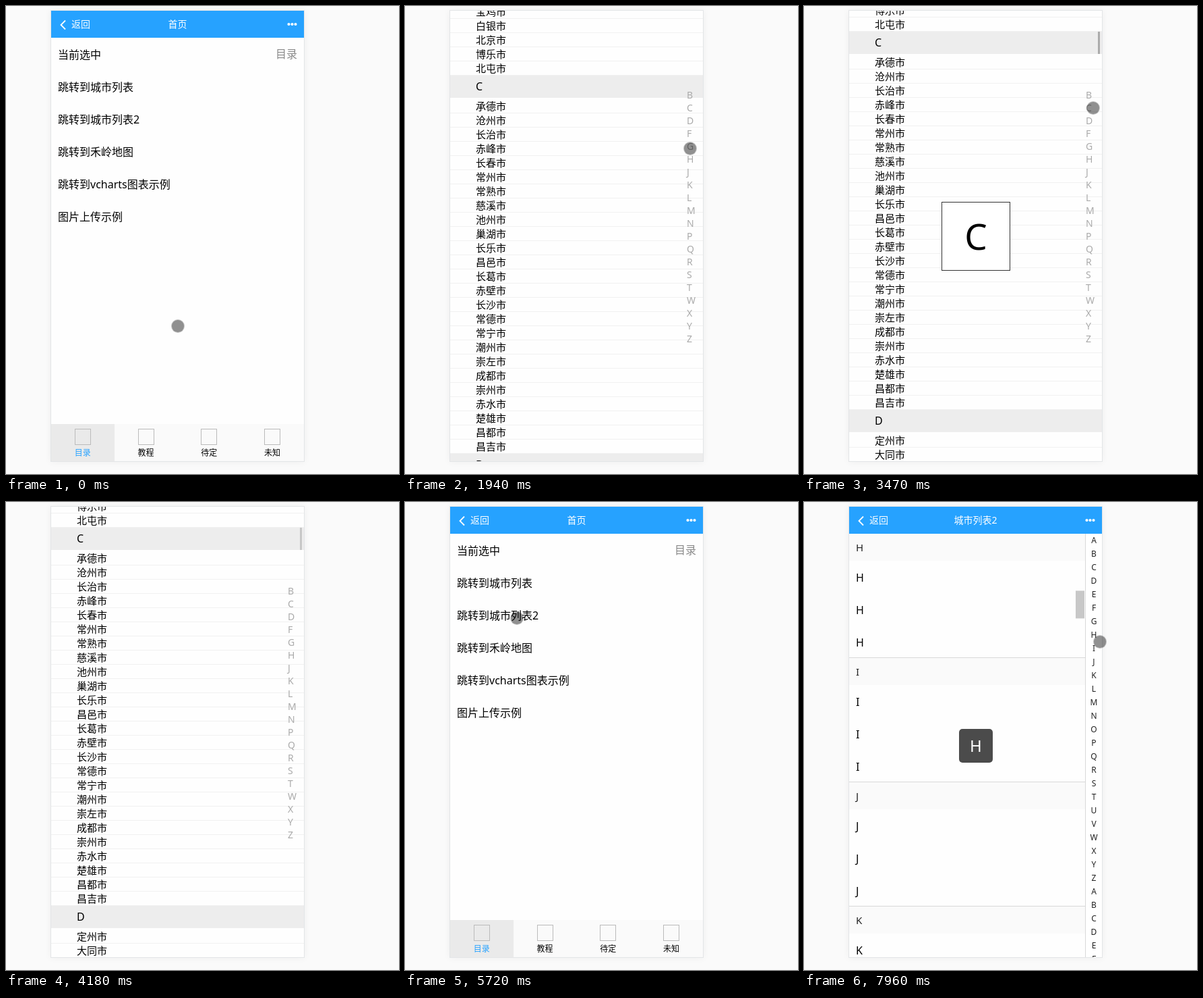
An HTML page that plays this animation: 583 px wide and 693 px high, repeating every 8 s.

```html
<!DOCTYPE html>
<html lang="zh-CN">
<head>
<meta charset="utf-8">
<title>移动端示例</title>
<style>
* { box-sizing: border-box; }
html, body { margin: 0; width: 100%; height: 100%; overflow: hidden; }
body {
  position: relative; background: #fafafa; color: #000;
  font: 16px/48px "Noto Sans", "Noto Sans CJK SC", "Noto Sans CJK", sans-serif;
}
#phone {
  position: absolute; left: 67px; top: 7px; width: 375px; height: 667px;
  overflow: hidden; background: #fff;
  box-shadow: 0 0 0 1px #e3e5e7, 0 0 10px 1px rgba(0, 0, 0, .05);
}
.screen { position: absolute; inset: 0; background: #fefefe; animation: 8s step-end infinite; }
.head {
  position: absolute; z-index: 2; inset: 0 0 auto; height: 40px;
  background: #26a2ff; color: #fff; font-size: 14px; line-height: 40px; text-align: center;
}
.head svg { position: absolute; inset: 0; }
.head .back { position: absolute; left: 30px; }

/* home */
#home { animation-name: home; }
.cells { position: absolute; left: 10px; right: 10px; top: 41px; }
.cells div { height: 48px; }
.cells span { float: right; color: #888; line-height: 46px; }
.tabs { position: absolute; inset: auto 0 0; height: 55px; display: flex; background: #fafafa; }
.tabs div { flex: 1; padding-top: 7px; font-size: 12px; line-height: 23px; text-align: center; }
.tabs i { display: block; width: 24px; height: 24px; margin: 0 auto; border: 1px solid #bbb; }
.tabs .on { background: #eaeaea; color: #26a2ff; }

/* city list */
#cities { animation-name: cities; }
#towns { position: absolute; left: 0; right: 0; top: 31px; transform: translateY(calc(0px - var(--top))); }
#towns h4 { margin: 0 0 2px; height: 33px; padding-left: 38px; background: #ededed; font: inherit; line-height: 33px; }
#towns div { height: 21px; padding-left: 38px; border-bottom: 1px solid #f1f1f1; font-size: 15px; line-height: 21px; }
#letters { position: absolute; left: 351px; top: 115px; color: #aaa; font-size: 14px; line-height: 19px; }
.bar {
  position: absolute; left: 369px; top: 31px; width: 3px; height: 33px; background: #000;
  opacity: var(--bar); transform: translateY(calc((var(--top) - 140px) / 19.5));
}
.pop, .toast { position: absolute; overflow: hidden; text-align: center; opacity: var(--pop); }
.pop { left: 137px; top: 283px; width: 102px; height: 102px; border: 1px solid #333; background: #fff; font-size: 53px; line-height: 100px; }
.pop div { transform: translateY(calc(var(--n) * -100px)); }

/* indexed list */
#indexed { animation-name: indexed; }
#sections { position: absolute; left: 0; top: 40px; width: 350px; transform: translateY(calc(var(--i) * -184px)); }
#sections section { height: 184px; padding: 0 10px; border-bottom: 1px solid #d9d9d9; background: linear-gradient(#fafafa 40px, #fefefe 0); }
#sections h4 { margin: 0 0 1px; height: 40px; color: #222; font: 15px/40px "Noto Sans", sans-serif; }
#sections div { height: 48px; }
.thumb { position: absolute; left: 336px; top: 40px; width: 13px; height: 41px; background: #c8c8c8; transform: translateY(calc(var(--i) * 12.06px)); }
#nav { position: absolute; left: 350px; right: 0; top: 40px; bottom: 0; overflow: hidden; border-left: 1px solid #d9d9d9; background: #fff; color: #222; font-size: 12px; line-height: 20px; text-align: center; }
.toast { left: 163px; top: 329px; width: 50px; height: 50px; border-radius: 5px; background: rgba(0, 0, 0, .7); color: #fff; font-size: 24px; line-height: 50px; }
.toast div { transform: translateY(calc((var(--i) - 3) * -50px)); }

#touch {
  position: absolute; left: -9.5px; top: -9.5px; width: 19px; height: 19px; border-radius: 50%;
  border: 1px solid rgba(0, 0, 0, .06); background: rgba(0, 0, 0, .43);
  animation: move 8s ease-in-out infinite, shown 8s step-end infinite;
}

@keyframes home {
  0%, 54.125% { visibility: visible; }
  15.25%, 75.375%, 100% { visibility: hidden; }
}
@keyframes cities {
  0% { visibility: hidden; --top: 75px; --n: 0; --pop: 0; --bar: 0; }
  15.25% { visibility: visible; --top: 75px; --n: 0; --pop: 0; --bar: 0; }
  30% { visibility: visible; --top: var(--G); --n: 0; --pop: 1; --bar: .28; }
  32.7% { visibility: visible; --top: var(--F); --n: 1; --pop: 1; --bar: .28; }
  35% { visibility: visible; --top: var(--D); --n: 2; --pop: 1; --bar: .28; }
  40.5% { visibility: visible; --top: var(--C); --n: 3; --pop: 1; --bar: .28; }
  46.5% { visibility: visible; --top: var(--C); --n: 3; --pop: 0; --bar: .28; }
  50% { visibility: visible; --top: var(--C); --n: 3; --pop: 0; --bar: .16; }
  54.125%, 100% { visibility: hidden; --top: var(--C); --n: 3; --pop: 0; --bar: 0; }
}
@keyframes indexed {
  0% { visibility: hidden; --i: 0; --pop: 0; }
  75.375% { visibility: visible; --i: 0; --pop: 0; }
  90.6% { visibility: visible; --i: 3; --pop: 1; }
  92.6% { visibility: visible; --i: 4; --pop: 1; }
  94% { visibility: visible; --i: 5; --pop: 1; }
  95.2% { visibility: visible; --i: 6; --pop: 1; }
  96.7%, 100% { visibility: visible; --i: 7; --pop: 1; }
}
@keyframes move {
  0%, .6% { transform: translate(254.5px, 473.5px); }
  10.5%, 15% { transform: translate(154.5px, 127.5px); }
  24.25%, 30% { transform: translate(422.5px, 210.5px); }
  36.75%, 38% { transform: translate(430.5px, 164.5px); }
  41.5%, 46.25% { transform: translate(428.5px, 150.5px); }
  49.4% { transform: translate(422px, 17px); }
  49.5%, 58.1% { transform: translate(48.5px, 19.5px); }
  62.5% { transform: translate(429.5px, 617.5px); }
  67.5%, 69.4% { transform: translate(164px, 185.5px); }
  71.5%, 75.3% { transform: translate(165.5px, 171.5px); }
  85%, 86% { transform: translate(441.5px, 119.5px); }
  86.9% { transform: translate(439.5px, 114.5px); }
  87.9%, 89.6% { transform: translate(437px, 110px); }
  99.5%, 100% { transform: translate(438.5px, 206.5px); }
}
@keyframes shown {
  0%, 58.1%, 100% { opacity: 1; }
  49.4% { opacity: 0; }
}
</style>
</head>
<body>
<div id="phone">
  <div class="screen" id="home">
    <div class="head" data-title="首页"></div>
    <div class="cells">
      <div>当前选中<span>目录</span></div>
      <div>跳转到城市列表</div>
      <div>跳转到城市列表2</div>
      <div>跳转到禾岭地图</div>
      <div>跳转到vcharts图表示例</div>
      <div>图片上传示例</div>
    </div>
    <div class="tabs">
      <div class="on"><i></i>目录</div>
      <div><i></i>教程</div>
      <div><i></i>待定</div>
      <div><i></i>未知</div>
    </div>
  </div>

  <div class="screen" id="cities">
    <div id="towns"></div>
    <div id="letters"></div>
    <div class="bar"></div>
    <div class="pop"><div>G<br>F<br>D<br>C</div></div>
  </div>

  <div class="screen" id="indexed">
    <div class="head" data-title="城市列表2"></div>
    <div id="sections"></div>
    <div class="thumb"></div>
    <div id="nav"></div>
    <div class="toast"><div>D<br>E<br>F<br>G<br>H</div></div>
  </div>
</div>
<div id="touch"></div>

<script>
const $ = id => document.getElementById(id);
const alphabet = 'ABCDEFGHIJKLMNOPQRSTUVWXYZ';

// Only the part of the list that can scroll into view.
const groups = {
  B: '宝鸡 白银 北京 博乐 北屯',
  C: '承德 沧州 长治 赤峰 长春 常州 常熟 慈溪 池州 巢湖 长乐 昌邑 长葛 赤壁 长沙 常德 常宁 潮州 崇左 成都 崇州 赤水 楚雄 昌都 昌吉',
  D: '定州 大同 大连 丹东 灯塔 东港 大石桥 德惠 大安 敦化 大庆 东宁 丹阳 东台 东阳 德兴 德州 东营 登封 邓州 丹江口 大冶 当阳 东莞 东兴 东方 德阳 达州 都江堰 都匀 大理 德令哈 敦煌 儋州',
  F: '丰镇 抚顺 阜新 凤城 扶余 富锦 奉化 阜阳 福州 福安 福清 福鼎 抚州 丰城 肥城 佛山 防城港 福泉 阜康',
  G: '高碑店 古交 根河 盖州 公主岭 高邮 广德 赣州 高安 高密 巩义 广水 广州 高州 桂林 贵港 桂平 广元 广安 广汉 贵阳 个旧 格尔木 固原',
  H: '邯郸 河间 衡水 黄骅 霍州 侯马 河津'
};

let top_ = 0;
let html = '';
for (const [letter, names] of Object.entries(groups)) {
  const list = names.split(' ');
  $('cities').style.setProperty('--' + letter, top_ + 'px');
  html += `<h4>${letter}</h4>` + list.map(name => `<div>${name}市</div>`).join('');
  top_ += 35 + 21 * list.length;
}
$('towns').innerHTML = html;
$('letters').innerHTML = [...'BCDFGHJKLMNPQRSTWXYZ'].join('<br>');

const twice = [...alphabet + alphabet];
$('sections').innerHTML = twice
  .map(c => `<section><h4>${c}</h4>${`<div>${c}</div>`.repeat(3)}</section>`).join('');
$('nav').innerHTML = twice.join('<br>');

for (const head of document.querySelectorAll('.head')) {
  head.innerHTML = `<svg width="375" height="40" fill="#fff">
    <path d="M21 14.5l-6.5 6.5 6.5 6.5" fill="none" stroke="#fff" stroke-width="1.8"/>
    <circle cx="352.5" cy="20" r="2.1"/><circle cx="357.5" cy="20" r="2.1"/><circle cx="362.5" cy="20" r="2.1"/>
  </svg><span class="back">返回</span>${head.dataset.title}`;
}
</script>
</body>
</html>
```
